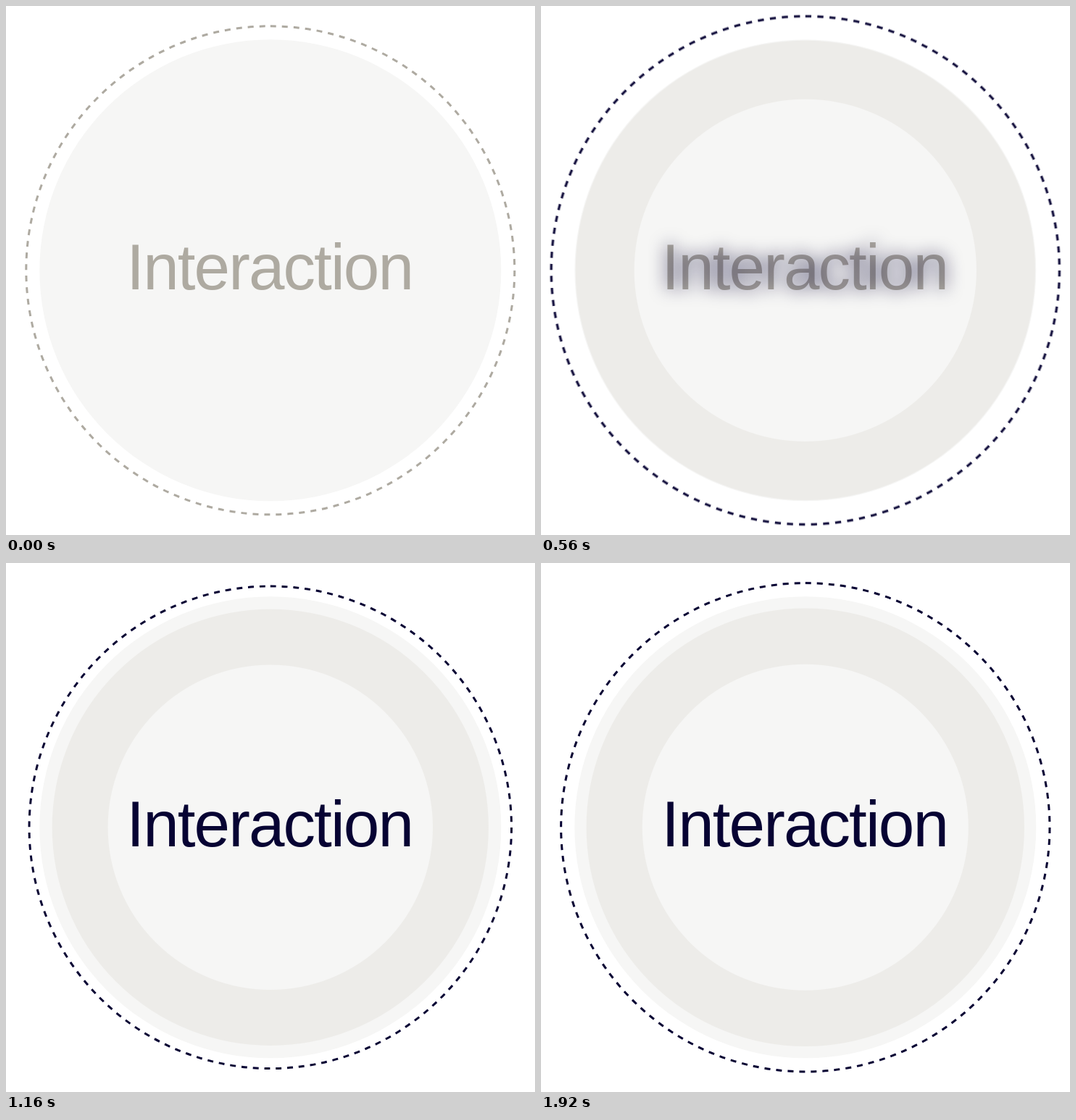
An HTML page with a canvas for the animation above (1.96 s loop, 730 by 730 pixels).

```html
<!DOCTYPE html>
<html lang="en">
<head>
<meta charset="utf-8">
<title>Interaction</title>
<style>
  html, body { margin: 0; width: 100%; height: 100%; overflow: hidden; background: #fff; }
  canvas { display: block; width: 730px; height: 730px; }
</style>
</head>
<body>
<canvas id="stage" width="730" height="730"></canvas>
<script>
const SIZE = 730, CENTER = 364.8;
const LOOP = 1960, STEP = 40, START = 240, SHUTTER = 20, SAMPLES = 8;
const GRAY = '#aeaaa1', NAVY = '#070333', DISC = '#f6f6f5', BAND = '#edece9';
const DASH = { radius: 337, width: 3, count: 132 };
const RING = { inner: 225, outer: 302.2 };

// Linear growth up to `land`, then a decaying one-hertz swing.
const dashMotion = { begin: 220, land: 480, from: 0.8, swing: 0.107, decay: 3 };
const ringMotion = { begin: 240, land: 440, from: 0.6, swing: 0.132, decay: 5 };

// time, blur radius, opacity of the navy lettering
const focus = [
  [240, 16, 0], [400, 14, 0.42], [560, 11.5, 0.68],
  [840, 7, 0.9], [1120, 0, 1]
];

const ctx = document.getElementById('stage').getContext('2d');
const layer = document.createElement('canvas');
layer.width = layer.height = SIZE;
const layerCtx = layer.getContext('2d');

function scaleAt(t, m) {
  if (t < m.land) {
    const p = Math.max(0, (t - m.begin) / (m.land - m.begin));
    return m.from + (1 - m.from) * p;
  }
  const s = (t - m.land) / 1000;
  return 1 + m.swing * Math.sin(2 * Math.PI * s) * Math.exp(-m.decay * s);
}

function focusAt(t) {
  const i = focus.findIndex(row => row[0] > t);
  if (i < 0) return { blur: 0, opacity: 1 };
  const a = focus[i - 1], b = focus[i];
  const p = (t - a[0]) / (b[0] - a[0]);
  const mix = k => a[k] + (b[k] - a[k]) * p;
  return { blur: mix(1), opacity: mix(2) };
}

function circle(c, radius) {
  c.beginPath();
  c.arc(CENTER, CENTER, radius, -Math.PI / 2, Math.PI * 1.5);
}

function strokeDashes(c, scale) {
  const radius = DASH.radius * scale;
  const half = Math.PI * radius / DASH.count;
  c.lineWidth = DASH.width * scale;
  c.setLineDash([half, half]);
  circle(c, radius);
  c.stroke();
}

function strokeRing(c, scale) {
  c.lineWidth = (RING.outer - RING.inner) * scale;
  c.setLineDash([]);
  circle(c, (RING.outer + RING.inner) / 2 * scale);
  c.stroke();
}

// Averages several moments inside the shutter time.
function motionBlur(draw, motion, t, color) {
  const c = layerCtx;
  c.clearRect(0, 0, SIZE, SIZE);
  c.globalCompositeOperation = 'lighter';
  c.globalAlpha = 1 / SAMPLES;
  c.strokeStyle = color;
  for (let i = 0; i < SAMPLES; i++) {
    const offset = ((i + 0.5) / SAMPLES - 0.5) * SHUTTER;
    draw(c, scaleAt(t + offset, motion));
  }
  c.globalAlpha = 1;
  c.globalCompositeOperation = 'source-in';
  c.fillStyle = color;
  c.fillRect(0, 0, SIZE, SIZE);
  c.globalCompositeOperation = 'source-over';
  ctx.drawImage(layer, 0, 0);
}

function label(color) {
  ctx.font = '89px "Liberation Sans", Arial, sans-serif';
  ctx.letterSpacing = '-1.9px';
  ctx.fillStyle = color;
  ctx.fillText('Interaction', 166.3, 391);
}

function focusedLabel(t) {
  const { blur, opacity } = focusAt(t);
  ctx.save();
  circle(ctx, RING.inner * scaleAt(t, ringMotion));
  ctx.clip();
  ctx.globalAlpha = opacity;
  if (blur) ctx.filter = `blur(${blur}px)`;
  label(NAVY);
  ctx.restore();
}

function render(t) {
  ctx.fillStyle = '#fff';
  ctx.fillRect(0, 0, SIZE, SIZE);
  ctx.fillStyle = DISC;
  circle(ctx, 318.5);
  ctx.fill();

  if (t < START) {
    ctx.strokeStyle = GRAY;
    strokeDashes(ctx, 1);
    label(GRAY);
    return;
  }
  motionBlur(strokeRing, ringMotion, t, BAND);
  motionBlur(strokeDashes, dashMotion, t, NAVY);
  if (t < 1120) label(GRAY);
  focusedLabel(t);
}

const origin = performance.now();
let shown = -1;
function tick() {
  const elapsed = (performance.now() - origin) % LOOP;
  const t = Math.floor(elapsed / STEP) * STEP;
  if (t !== shown) render(shown = t);
  requestAnimationFrame(tick);
}
tick();
</script>
</body>
</html>
```
